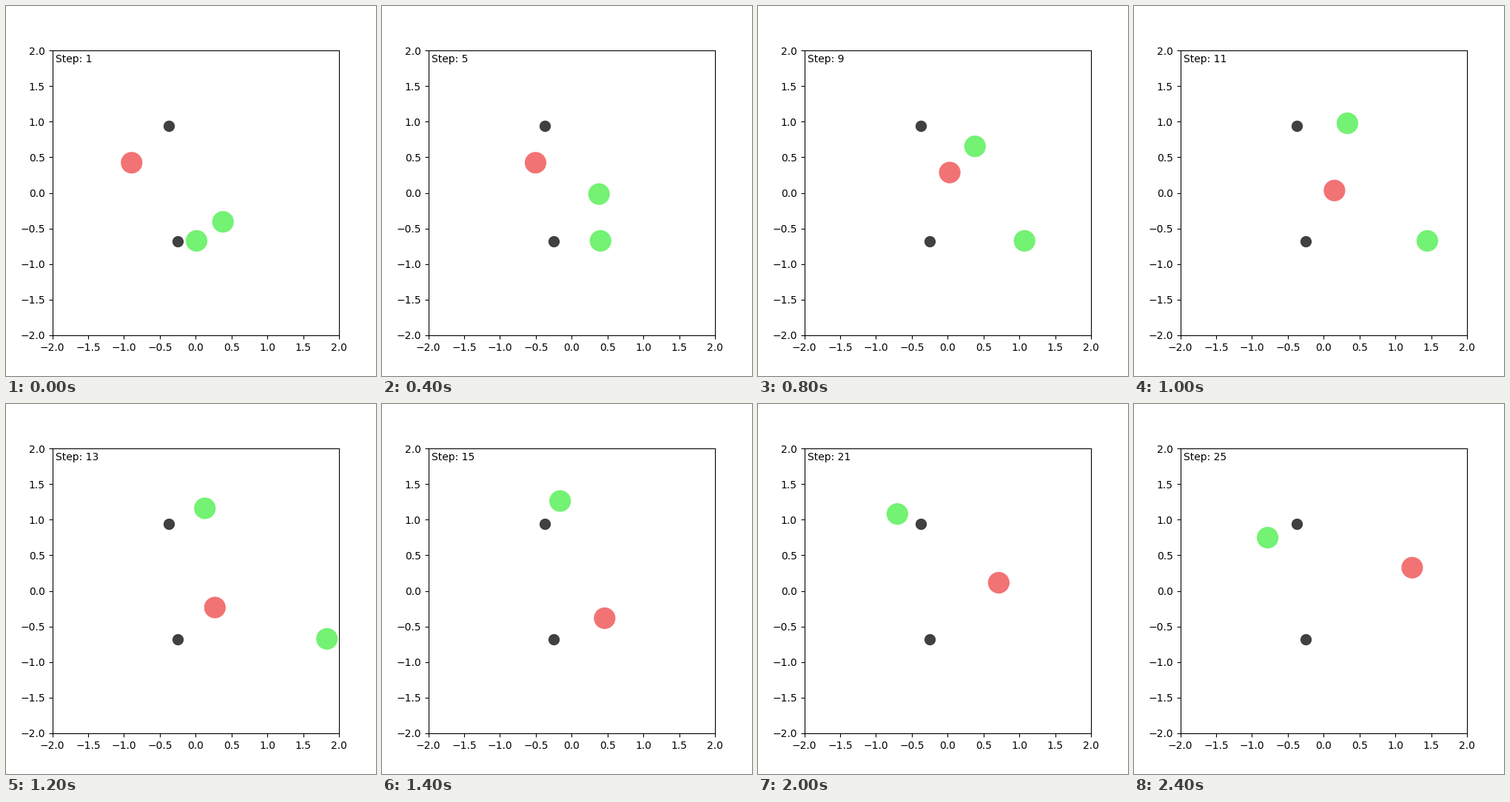
Animation, 500 px wide and 500 px high, one loop 2500 ms. Source, as a matplotlib script:

```python
import matplotlib.pyplot as plt
import numpy as np
from matplotlib.animation import FuncAnimation

STEPS = 25
THRUST = 0.05   # displacement gained per push
KEEP = 0.75     # share of speed kept after damping
DIRS = {"R": (1, 0), "L": (-1, 0), "U": (0, 1), "D": (0, -1), ".": (0, 0)}

RED, GREEN, DARK = (0.95, 0.45, 0.45), (0.45, 0.95, 0.45), (0.25, 0.25, 0.25)
LANDMARKS = [(-0.379, 0.937), (-0.254, -0.682)]


def path(start, moves):
    """Positions of a damped particle pushed once per step."""
    pos, vel = np.array(start, float), np.zeros(2)
    points = [pos.copy()]
    for move in moves:
        vel = KEEP * vel + THRUST * np.array(DIRS[move])
        pos = pos + vel
        points.append(pos)
    return np.array(points)


paths = np.array([
    path((-0.893, 0.423), "R" * 6 + "D" * 5 + "RR." + "U" * 5 + "R" * 5),
    path((0.013, -0.674), "R" * 24),
    path((0.382, -0.407), "U" * 9 + "L" * 6 + "D..DDD..."),
])

fig, ax = plt.subplots(figsize=(5, 5), dpi=100)
ax.set_xlim(-2, 2)
ax.set_ylim(-2, 2)

ax.scatter(*zip(*LANDMARKS), s=100, color=[DARK])
agents = ax.scatter(*paths[:, 0].T, s=400, color=[RED, GREEN, GREEN])
label = ax.text(-1.95, 1.95, "", va="top", fontsize=10)


def update(i):
    agents.set_offsets(paths[:, i])
    label.set_text(f"Step: {i + 1}")
    return agents, label


anim = FuncAnimation(fig, update, frames=STEPS, interval=100, repeat=True)
plt.show()
```
